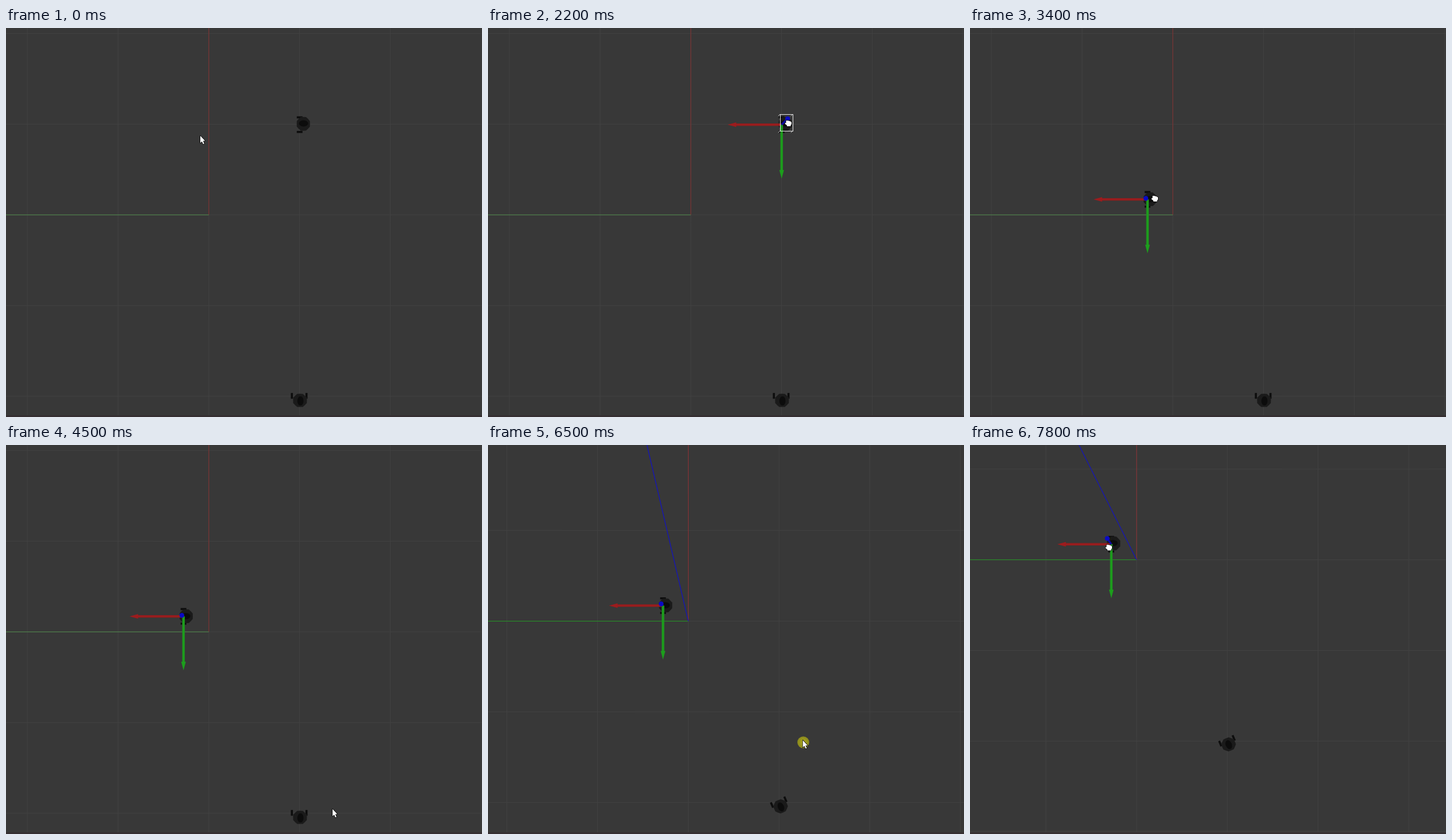
These frames come from a looping animation (828x677 px, 8 s). An HTML page with a canvas:

```html
<!DOCTYPE html>
<html>
<head>
<meta charset="utf-8">
<style>
html, body { margin: 0; width: 100%; height: 100%; overflow: hidden; background: #383838; }
canvas { display: block; }
</style>
</head>
<body>
<canvas id="stage" width="828" height="677"></canvas>
<script>
const ctx = document.getElementById('stage').getContext('2d');
const LOOP = 8000, STEP = 100, CELL = 157.8;
const CENTER = { x: 352.8, y: 325.2 };   // the point straight below the camera

const add = (...points) => points.reduce((a, b) => ({ x: a.x + b.x, y: a.y + b.y }));

// Shift by (dx, dy) between two times, bulging sideways by (bx, by) halfway.
function glide(t, start, end, dx, dy, bx = 0, by = 0) {
  const u = Math.min(1, Math.max(0, (t - start) / (end - start)));
  const bulge = Math.sin(Math.PI * u);
  return { x: dx * u + bx * bulge, y: dy * u + by * bulge };
}

const panAt = t => glide(t, 6400, 6900, -63, -125.5, 14, 11);
const robotAt = t => add({ x: 158, y: -157 }, glide(t, 2300, 3200, -202, 130, -49));
const cursorAt = t => add(
  { x: 337, y: 186 },
  glide(t, 0, 800, 179, -27, 100, -35),       // reach the first robot
  glide(t, 2300, 3200, -201, 131, -59, 6),    // drag it
  glide(t, 3600, 4500, 252, 342),             // reach the second robot
  glide(t, 4500, 5500, -5, -66, 13),          // turn it
  glide(t, 5500, 6300, -11, -35),
  panAt(t),
  glide(t, 7000, 7800, -253, -234, -90, 90)   // back to the first robot
);

function line(x1, y1, x2, y2, color, width = 1) {
  ctx.strokeStyle = color;
  ctx.lineWidth = width;
  ctx.beginPath();
  ctx.moveTo(x1, y1);
  ctx.lineTo(x2, y2);
  ctx.stroke();
}

function oval(x, y, rx, ry, color) {
  ctx.fillStyle = color;
  ctx.beginPath();
  ctx.ellipse(x, y, rx, ry, 0, 0, Math.PI * 2);
  ctx.fill();
}

function drawGrid(o) {
  for (let i = -4; i <= 5; i++) {
    const x = o.x + i * CELL, y = o.y + i * CELL;
    line(x, 0, x, 677, '#424242');
    line(0, y, 828, y, '#424242');
  }
}

function drawAxes({ x, y }, pan) {
  line(x, 0, x, y, pan.y ? '#903034' : '#863131');
  line(0, y, x, y, pan.y ? '#259825' : '#508d4d');
  if (pan.y) line(x, y, x - y * pan.x / pan.y, 0, '#1414bc', 1.3);
}

// Taller parts lean away from the view centre.
const lean = (p, height) => ({ x: (p.x - CENTER.x) * height, y: (p.y - CENTER.y) * height });

function drawRobot(p, degrees) {
  const layer = (height, draw) => {
    const top = add(p, lean(p, height));
    ctx.save();
    ctx.translate(top.x, top.y);
    ctx.rotate(degrees * Math.PI / 180);
    draw();
    ctx.restore();
  };
  layer(0, () => {
    ctx.fillStyle = '#0d0d0d';
    for (const side of [-1, 1]) ctx.fillRect(-5, side * 12.7 - 1.8, 10, 3.6);
  });
  layer(0.009, () => {
    ctx.fillStyle = '#1a1a1a';
    ctx.beginPath();
    for (let i = 0; i < 16; i++) {
      const a = i * Math.PI / 8, r = i % 2 ? 12.8 : 12;
      ctx.lineTo(5 + Math.cos(a) * r * 0.96, Math.sin(a) * r);
    }
    ctx.fill();
  });
  layer(0.014, () => oval(4.5, 0, 8, 5.4, '#0c0c0c'));
}

function drawArrow(p, degrees, color, edge) {
  ctx.save();
  ctx.translate(p.x, p.y);
  ctx.rotate(degrees * Math.PI / 180);
  line(0, 0, 80, 0, edge, 4.6);
  line(0, 0, 80, 0, color, 2.6);
  ctx.fillStyle = color;
  ctx.fill(new Path2D('M94 0L79 -4V4Z'));
  ctx.restore();
}

function drawGizmo(p) {
  drawArrow(p, 180, '#9c1c1e', '#84201f');
  drawArrow(p, 90, '#1c9e1c', '#228a22');
  const tip = add(p, lean(p, 0.066));
  line(p.x, p.y, tip.x, tip.y, '#0c0c9c', 3.5);
  oval(tip.x, tip.y, 4.2, 4.2, '#0a0ac4');
}

function drawBox(p) {
  const s = lean(p, 0.021);
  for (const x of [p.x - 6, p.x + 16])
    for (const y of [p.y - 15, p.y + 14])
      line(x, y, x + s.x, y + s.y, '#c8c8c8');
  ctx.strokeStyle = '#e6e6e6';
  ctx.strokeRect(Math.round(p.x - 6 + s.x) + 0.5, Math.round(p.y - 15 + s.y) + 0.5, 22, 29);
}

function drawBall({ x, y }) {
  const shade = ctx.createRadialGradient(x, y, 2, x, y, 10.5);
  shade.addColorStop(0, '#a3a11f');
  shade.addColorStop(1, '#8b891c');
  oval(x, y, 10.3, 10.3, shade);
}

const arrow = new Path2D('M1 1.5V14L3.8 11.4L6 16.2L7.9 15.3L5.8 10.6H9.4Z');
const hand = new Path2D('M2.5 2.5Q4 1 5 2.5Q6.5 1.3 7.5 3Q9 2 10 3.8Q12 3.5 12 5.5V8.5L10.5 10V12H4V10.5L.8 8Q0 5.8 2.5 6Z');

function drawCursor(p, shape) {
  ctx.save();
  ctx.translate(p.x, p.y);
  ctx.lineJoin = 'round';
  ctx.lineWidth = 1.5;
  ctx.strokeStyle = '#000';
  ctx.stroke(shape);
  ctx.fillStyle = '#fff';
  ctx.fill(shape);
  ctx.restore();
}

function draw(t) {
  const during = (start, end) => t >= start && t < end;
  const pan = panAt(t), origin = add(CENTER, pan), robot = add(origin, robotAt(t));

  ctx.fillStyle = '#383838';
  ctx.fillRect(0, 0, 828, 677);
  drawGrid(origin);
  if (!during(2400, 3400)) drawAxes(origin, pan);

  drawRobot(add(origin, { x: 157.2, y: 315 }), 90 + glide(t, 4500, 5500, -23, 0).x);
  drawRobot(robot, 0);
  if (t >= 2200) drawGizmo(robot);
  if (during(2200, 3400)) drawBox(robot);
  if (during(6300, 6900)) drawBall(add(origin, { x: 200, y: 211 }));

  ctx.fillStyle = '#352f31';
  ctx.fillRect(0, 674, 828, 3);
  drawCursor(cursorAt(t), during(2200, 3700) || t >= 7800 ? hand : arrow);
}

function tick() {
  draw(Math.floor(performance.now() % LOOP / STEP) * STEP);
  requestAnimationFrame(tick);
}
tick();
</script>
</body>
</html>
```
